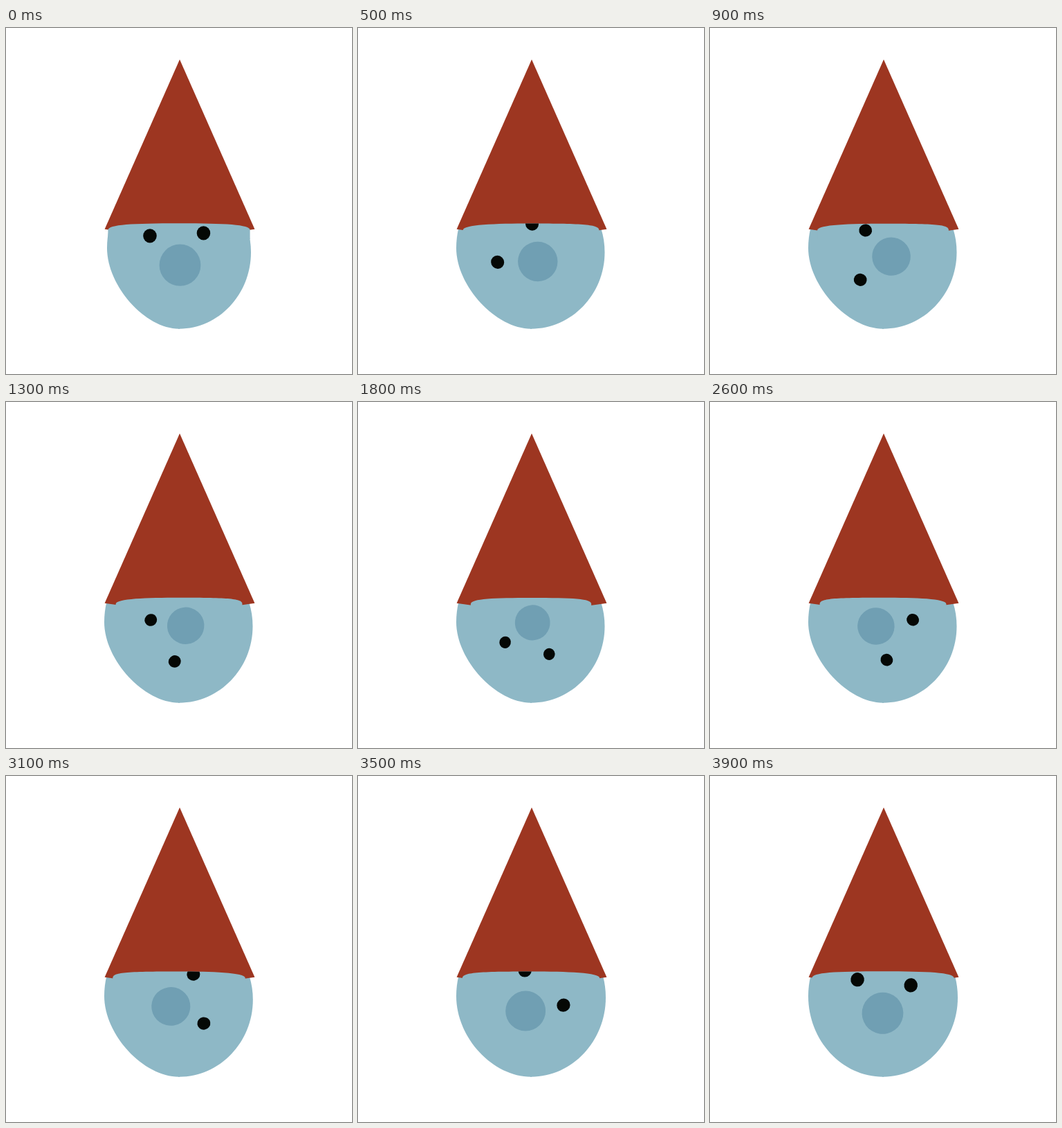
Recreate the animation shown at these times as an HTML page with a canvas. Size 500 px wide and 500 px high, loop 4000 ms.

```html
<!DOCTYPE html>
<html lang="en">
<head>
<meta charset="utf-8">
<title>Gnome</title>
<style>
  html, body { margin: 0; width: 100%; height: 100%; overflow: hidden; background: #fff; }
  canvas { display: block; width: 500px; height: 500px; }
</style>
</head>
<body>
<canvas id="stage" width="500" height="500"></canvas>
<script>
const ctx = document.getElementById('stage').getContext('2d');
const LOOP = 4, STEP = 0.1;
const CX = 250, CY = 329.7, CHIN = 434.7;
const RED = '#9d3621', SKIN = '#8eb8c6', NOSE = '#709fb3', EYE = '#050805';

// Progress from 0 to 1 between two times.
const ramp = (t, from, to) => Math.min(1, Math.max(0, (t - from) / (to - from)));

const turn = t => 2 * Math.PI * t / LOOP;

// Shrinks to 5/6 by mid-loop and grows back, at constant speed.
const scaleAt = t => 1 - (1 - Math.abs(1 - (t + 0.05) / 2)) / 6;

function dot(x, y, rx, ry, color) {
  ctx.fillStyle = color;
  ctx.beginPath();
  ctx.ellipse(x, y, rx, ry, 0, 0, 2 * Math.PI);
  ctx.fill();
}

// Half of the head, from the chin out to the cheek and up under the hat.
function headHalf(side, width, cheekY, round) {
  const drop = CHIN - cheekY, x = CX + side * width;
  ctx.beginPath();
  ctx.moveTo(CX, CHIN);
  ctx.bezierCurveTo(CX + side * width * round, CHIN, x, cheekY + drop * round, x, cheekY);
  ctx.bezierCurveTo(x, cheekY - drop * 0.55, CX + side * width * 0.55, cheekY - drop, CX, cheekY - drop);
  ctx.lineTo(CX, CHIN);
  ctx.fill();
}

// The head swells at the start and again at the end of each loop.
function drawHead(t) {
  const early = ramp(t, 0, 0.5), late = ramp(t, 3, 3.5), fill = ramp(t, 3, 3.9);
  ctx.save();
  ctx.beginPath();
  ctx.rect(0, 290, 500, 210);
  ctx.clip();
  ctx.fillStyle = SKIN;
  headHalf(-1, 104 + 4 * early, 318, 0.47 + 0.08 * fill);
  headHalf(1, 104 + 2.5 * early + 1.5 * late, 324 - 4 * late, 0.55);
  ctx.fillRect(CX - 1, 290, 2, CHIN - 290);
  ctx.restore();
}

function drawHat() {
  ctx.fillStyle = RED;
  ctx.beginPath();
  ctx.moveTo(251, 45.5);
  ctx.lineTo(359.4, 290.7);
  ctx.quadraticCurveTo(251, 308, 142.6, 290.7);
  ctx.closePath();
  ctx.fill();
}

// The forehead line leans with the turn of the face.
function clipFace(t) {
  const s = scaleAt(t), w = 103 * s;
  const top = 282.3 + 4.5 * (1 - s), lean = 0.17 * Math.sin(turn(t));
  ctx.beginPath();
  ctx.moveTo(CX - w, 450);
  ctx.lineTo(CX - w, 292);
  ctx.bezierCurveTo(CX - w, 284, CX - (0.65 - lean) * w, top, CX, top);
  ctx.bezierCurveTo(CX + (0.65 + lean) * w, top, CX + w, 284, CX + w, 292);
  ctx.lineTo(CX + w, 450);
  ctx.closePath();
  ctx.clip();
}

function drawFace(t) {
  const s = scaleAt(t);
  ctx.save();
  clipFace(t);
  ctx.fillStyle = SKIN;
  ctx.fillRect(0, 275, 500, 30);
  ctx.translate(CX, CY);
  ctx.rotate(-turn(t));
  ctx.scale(s, s);
  dot(-42.2, -29.4, 9.8, 10.2, EYE);
  dot(35.6, -33.4, 9.8, 10.2, EYE);
  dot(1.5, 13, 30, 30.2, NOSE);
  ctx.restore();
}

function draw(t) {
  ctx.fillStyle = '#fff';
  ctx.fillRect(0, 0, 500, 500);
  drawHead(t);
  drawHat();
  drawFace(t);
}

const start = performance.now();
function tick() {
  const ms = Math.max(0, performance.now() - start) % (LOOP * 1000);
  draw(Math.floor(ms / 100) * STEP);
  requestAnimationFrame(tick);
}
tick();
</script>
</body>
</html>
```
